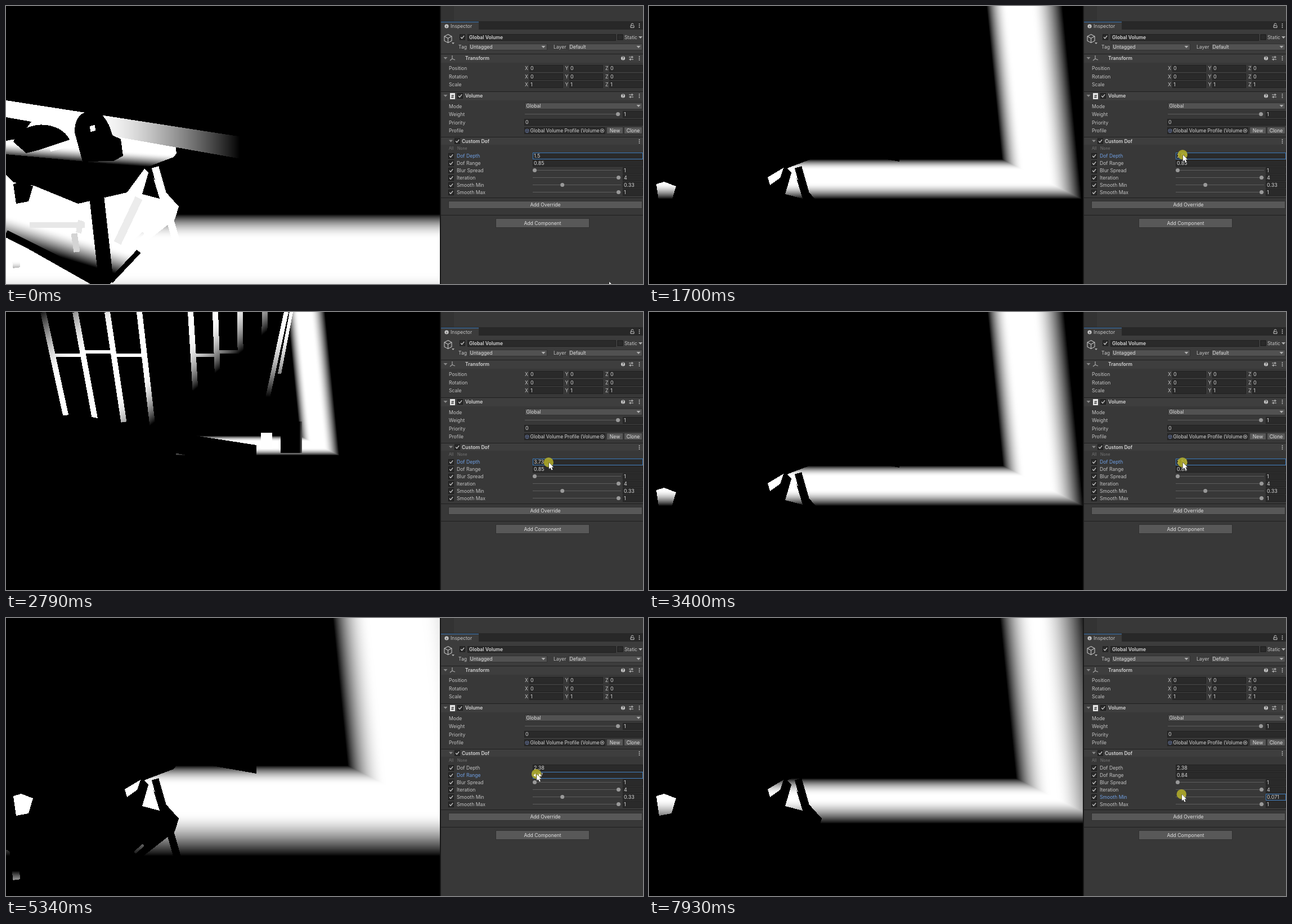
Animation, 1132 px wide and 495 px high, one loop 8 s. Source, as an HTML page with a canvas:

```html
<!DOCTYPE html>
<html>
<head>
<meta charset="utf-8">
<style>
html, body { margin: 0; width: 100%; height: 100%; overflow: hidden; background: #000 }
canvas { display: block }
</style>
</head>
<body>
<canvas id="stage" width="1132" height="495"></canvas>
<script>
const W = 772, H = 495, LOOP = 8000;
const ctx = stage.getContext('2d');
const pen = new OffscreenCanvas(W, H).getContext('2d', { willReadFrequently: true });

const clamp = v => Math.min(1, Math.max(0, v));
const mix = (a, b, p) => a + (b - a) * p;
const smooth = p => p * p * (3 - 2 * p);
const span = (t, from, to) => clamp((t - from) / (to - from));
const ease = (t, from, to) => smooth(span(t, from, to));

// ---------- depth map of the room: every surface is a formula z(x, y) ----------
const depth = new Float32Array(W * H).fill(99);
const floorZ = (x, y) => 640 / (y - 74) - .235;
const plankZ = x => 1 / (.628 + .000728 * x);
const windowZ = (x, y) => 1 / (.3104 - .00017 * (y + .81 * x));
const topZ = (x, y) => Math.min(1.36, 1 / (.735 + .0078 * (y - 250 - .07 * (x - 100))));
const shelfZ = (x, y) => Math.min(1.36, 1 / (.735 + .0043 * (y - 395 - .3 * (x - 75))));
const legZ = (x, y) => 1.36 + Math.max(0, y - 430) * .012;
const poleZ = (x, y) => 3.82 + y * .0022;
const NEAR = .9;

function surface(z, path, width) {
  pen.clearRect(0, 0, W, H);
  pen.lineWidth = width;
  width ? pen.stroke(new Path2D(path)) : pen.fill(new Path2D(path));
  const px = pen.getImageData(0, 0, W, H).data;
  for (let i = 0; i < W * H; i++)
    if (px[i * 4 + 3] > 127) depth[i] = z.call ? z(i % W, i / W | 0) : z;
}
const bar = (z, width, x1, y1, x2, y2) => surface(z, `M${x1},${y1}L${x2},${y2}`, width);

function buildRoom() {
  // floor, and the right wall that shares the depth of its foot
  for (let y = 0; y < H; y++) for (let x = 0; x < W; x++) {
    const onWall = y < .5 * x - 41;
    const foot = onWall ? (x - 4.1 - .1 * y) / .95 * .5 - 41 : y;
    if (foot > 200) depth[y * W + x] = floorZ(x, foot);
  }

  // two barred windows, their bars leaning towards a vanishing point
  for (const [start, gap] of [[66, 57], [328, 44]]) {
    const lean = x => .0006 * (430 - x);
    for (let i = 0; i < 4; i++) {
      const x = start + gap * i, bottom = 184 + 6 * i, y = 77 - 6 * (i % 2);
      bar(windowZ, 10, x, 0, x + lean(x) * bottom, bottom);
      if (i < 3) bar(windowZ, 6, x + lean(x) * y, y, x + gap + lean(x + gap) * y, y);
    }
  }
  bar(poleZ, 8, 498, 0, 463, 162);
  bar(poleZ, 6, 507, 0, 486, 110);

  // buckets
  bar(3.58, 21, 463, 215, 463, 244);
  bar(x => 3.28 + Math.max(0, x - 519) * .012, 38, 507, 195, 507, 251);

  // workbench: top, plank, shelf
  surface(topZ, 'M0,198L301,249L303,262L298,269L245,289L0,272Z');
  surface(plankZ, 'M0,168L445,237V277L0,198Z');
  surface(shelfZ, 'M0,290L245,288L307,357L300,380L236,430V440L185,495H150L0,410Z');
  bar(1.29, 14, 236, 342, 198, 422);
  bar(1.28, 9, 42, 390, 140, 390);
  bar(1.28, 10, 133, 382, 129, 404);
  bar(1.25, 11, 121, 405, 126, 438);
  bar(legZ, 13, 12, 408, 19, 466);
  surface(NEAR, 'M0,264L248,287L215,332L128,352L50,320L14,314L0,300Z');

  // gaps that show the floor
  surface(floorZ, 'M13,317L27,313L48,321L40,348L18,352Z');
  surface(floorZ, 'M242,335L256,287L273,343Z');
  surface(floorZ, 'M211,305L239,288L233,306L215,319Z');
  bar(floorZ, 5, 229, 418, 244, 404);

  bar(legZ, 13, 265, 287, 311, 449);
  bar(NEAR, 13, 0, 405, 155, 483);
  bar(NEAR, 9, 186, 490, 236, 437);
  bar(NEAR, 26, 161, 338, 178, 492);

  // helmet and lantern
  surface(NEAR, 'M0,198L45,206L22,236L0,240Z');
  surface(NEAR, 'M13,242A52,39 0 0 1 113,238L60,256L36,262Z');
  bar(1.35, 9, 78, 255, 114, 246);
  surface(1.5, 'M92,206Q117,204 121,221', 4);
  surface(NEAR, 'M136,277L122,225Q122,188 152,187Q178,188 189,230L204,237L208,267L191,276Z');
  bar(plankZ, 9, 153, 213, 155, 223);
}
buildRoom();

const image = ctx.createImageData(W, H);
const pixels = new Uint32Array(image.data.buffer);
let shown = '';

// White inside the focus band, fading to black at its limits, with display gamma
function drawMask(focus, range, min) {
  const key = [focus, range, min].join();
  if (key !== shown) {
    shown = key;
    for (let i = 0; i < depth.length; i++) {
      const d = Math.abs(depth[i] - focus) * 2 / range;
      const v = d >= 1 ? 0 : 255 * (1 - smooth(span(d, min, 1))) ** .4545;
      pixels[i] = 0xff000000 | (v | 0) * 0x10101;
    }
  }
  ctx.putImageData(image, 0, 0);
}

// ---------- inspector panel ----------
const TEXT = '#c4c4c4', BRIGHT = '#d6d6d6', DARK = '#2a2a2a', BLUE = '#6f9fe2', RING = '#3a79bb';

function box(x, y, w, h, fill, stroke) {
  ctx.fillStyle = fill;
  ctx.fillRect(x, y, w, h);
  if (stroke) {
    ctx.strokeStyle = stroke;
    ctx.lineWidth = 1;
    ctx.strokeRect(x + .5, y + .5, w - 1, h - 1);
  }
}
function text(s, x, y, { color = TEXT, bold, size = 8.6, align = 'left' } = {}) {
  ctx.font = `${bold ? 600 : 400} ${size}px Inter, sans-serif`;
  ctx.textAlign = align;
  ctx.fillStyle = color;
  ctx.fillText(s, x, y + 3.2);
}
function dot(x, y, r, color = TEXT) {
  ctx.fillStyle = color;
  ctx.beginPath();
  ctx.arc(x, y, r, 0, 7);
  ctx.fill();
}
function line(d, color = TEXT, width = 1) {
  ctx.strokeStyle = color;
  ctx.lineWidth = width;
  ctx.stroke(new Path2D(d));
}
function shape(d, color) {
  ctx.fillStyle = color;
  ctx.fill(new Path2D(d));
}
const arrow = (x, y, color = '#b0b0b0') => shape(`M${x - 3.5},${y - 2}h7l-3.5,4z`, color);
const rule = y => box(773, y, 359, 1, '#1f1f1f');
const menu = y => [-3, 0, 3].forEach(d => dot(1125.5, y + d, .9));

function button(s, x, y, w, h) {
  box(x, y, w, h, '#585858', '#303030');
  text(s, x + w / 2, y + h / 2, { align: 'center', color: '#e0e0e0' });
}
function field(s, x, y, w, ring) {
  box(x, y - 6, w, 12, DARK, ring || '#212121');
  text(s, x + 2, y, { color: BRIGHT, size: 8.9 });
}
function dropdown(s, x, y, w) {
  box(x, y - 6, w, 12, '#515151', '#303030');
  text(s, x + 2.5, y, { color: '#dedede' });
  arrow(x + w - 7, y);
}
function check(x, y, on = true) {
  box(x - 5, y - 5, 10, 10, DARK, '#1c1c1c');
  if (on) line(`M${x - 2.8},${y}l2,2.3l4,-5`, BRIGHT, 1.2);
}
function slider(x, y, w, part) {
  box(x, y - .5, w, 1, '#5e5e5e');
  dot(x + 3.5 + part * (w - 8), y, 3.5, '#999');
}
function header(y, title, x, h) {
  rule(y - 8);
  box(773, y - 7, 359, h, '#3e3e3e');
  text(title, x, y, { bold: true, color: BRIGHT });
  menu(y);
}
function headerIcons(y) {
  arrow(781, y, '#888');
  dot(1096.5, y, 3.6);
  text('?', 1096.5, y, { color: '#333', bold: true, size: 7, align: 'center' });
  line(`M1107,${y - 2}h8M1107,${y + 2}h8M1112.5,${y - 4}v4M1109.5,${y}v4`);
}

function drawObjectHeader() {
  box(773, 0, 23, 27, '#333');
  box(773, 27, 359, 15, '#282828');
  box(773, 28, 67, 14, '#3c3c3c');
  box(773, 28, 67, 1, RING);
  dot(783, 36, 3.6);
  box(782.5, 35, 1, 3, '#333');
  text('Inspector', 790, 36);
  line('M1111,35v-2a2,2 0 0 1 4,0M1110,35h6v3.5h-6z');
  menu(35);

  box(773, 42, 359, 43, '#3c3c3c');
  line('M785.5,50.5l6.5,3.5v8l-6.5,3.5l-6.5,-3.5v-8zM779,54l6.5,3.5l6.5,-3.5M785.5,57.5v8', TEXT, 1.1);
  shape('M792,65h5l-2.5,3z', '#b0b0b0');
  check(811, 55.5);
  box(820, 50, 264, 12, DARK, '#212121');
  text('Global Volume', 823, 56, { bold: true, color: BRIGHT });
  check(1091.5, 55.5, false);
  text('Static', 1099, 56);
  arrow(1127.5, 56);
  text('Tag', 804, 73);
  dropdown('Untagged', 822, 73, 140);
  text('Layer', 973, 73);
  dropdown('Default', 999, 73, 132);
}

function drawTransform() {
  header(93, 'Transform', 816, 15);
  headerIcons(93);
  line('M793,88v6l-4,3M793,94l5,2', '#a8a8a8', 1.2);
  ['Position', 'Rotation', 'Scale'].forEach((name, i) => {
    const y = 111 + i * 14.5;
    text(name, 787, y);
    ['X', 'Y', 'Z'].forEach((axis, j) => {
      text(axis, 922 + j * 71.5, y);
      field(i === 2 ? '1' : '0', 930 + j * 71, Math.round(y), 60);
    });
  });
}

function drawVolume() {
  header(160, 'Volume', 816, 15);
  headerIcons(160);
  box(789, 155, 9, 11, '#e4e4e4');
  text('#', 793.5, 160.5, { color: '#333', bold: true, size: 8, align: 'center' });
  check(807, 160);
  ['Mode', 'Weight', 'Priority', 'Profile'].forEach((s, i) => text(s, 787, 178.5 + i * 14.5));
  dropdown('Global', 922, 178, 209);
  slider(922, 192.5, 170, 1);
  field('1', 1096, 193, 36);
  field('0', 921, 207, 211);
  field('', 921, 222, 144);
  line('M926,219l3,1.5v3.5l-3,1.5l-3,-1.5v-3.5zM923,220.5l3,1.5l3,-1.5M926,222v3.5', '#6c7fb0', .8);
  text('Global Volume Profile (Volume', 931.5, 222, { color: BRIGHT });
  box(1054, 217, 10, 10, DARK);
  dot(1059.5, 222, 1.3);
  line('M1056.3,222a3.2,3.2 0 1 0 6.4,0a3.2,3.2 0 1 0 -6.4,0', TEXT, .9);
  button('New', 1067, 215, 30, 13);
  button('Clone', 1098, 215, 33, 13);
}

function drawDof(focus, range, min, active) {
  header(241, 'Custom Dof', 810, 13);
  arrow(790.5, 240.5, '#888');
  check(802, 240.5);
  text('All', 787, 253, { color: '#777', size: 7 });
  text('None', 802, 253, { color: '#777', size: 7 });
  const short = (v, digits) => String(+v.toFixed(digits));
  // name, shown value, slider position
  [
    ['Dof Depth', short(focus, 2)],
    ['Dof Range', short(range, 2)],
    ['Blur Spread', '1', 0],
    ['Iteration', '4', 1],
    ['Smooth Min', short(min, 3), min],
    ['Smooth Max', '1', 1]
  ].forEach(([name, value, part], i) => {
    const y = 267 + i * 13, ring = name === active && RING;
    check(791, y);
    text(name, 801, y, { color: ring ? BLUE : TEXT });
    if (part === undefined) return field(value, 936, y, 196, ring);
    slider(936, y - .5, 157, part);
    field(value, 1096, y, 36, ring);
  });
  rule(341);
  button('Add Override', 786, 347, 345, 14);
  rule(372);
  button('Add Component', 870, 378, 167, 17);
}

// ---------- pointer ----------
function drawCursor(t, { focus, range, min }) {
  // the pointer follows the dragged value and glides between the three rows
  const toDepth = ease(t, 70, 830), toRange = ease(t, 3900, 4560), toMin = ease(t, 6360, 7130);
  const glide = (start, a, b, c) => mix(mix(mix(start, a, toDepth), b, toRange), c, toMin);
  const x = glide(1072, 913.5 + 13.8 * focus, 914 + 19 * range - toRange * .5, 935.5 + 162 * min);
  const y = glide(491, 265 + 3 * ease(t, 2100, 2700), 278, 314);

  const pressed = t > 975 && t < 3900 || t > 4880 && t < 6250 || t > 7180;
  const resizing = t > 910 && t < 1060 || t > 4700 && t < 6360;
  if (pressed) dot(x - .7, y - .3, 8.7, 'rgba(190,184,40,.8)');
  if (resizing) shape(`M${x - 6},${y + 2}l4,-3v6zM${x + 8},${y + 2}l-4,-3v6z`, '#fff');
  const d = `M${x},${y}v11.5l2.6,-2.3l2,4.4l2,-.9l-2,-4.2h3.6z`;
  line(d, '#222', 1);
  shape(d, '#fff');
  if (t > 4450 && t < 4880) {
    box(945, 236, 21, 21, '#a01616');
    line('M950.5,245a4.3,4.3 0 1 0 8.6,0a4.3,4.3 0 1 0 -8.6,0M958,248.3l4,4', '#e8c8c8', 1.2);
  }
}

function valuesAt(t) {
  const fall = 1 - (1 - span(t, 2790, 3880)) ** 2.5;
  return {
    focus: mix(mix(1.5, 3.73, ease(t, 975, 2470)), 2.38, fall),
    range: mix(mix(.85, 1.72, ease(t, 4880, 5510)), .84, ease(t, 5740, 6085)),
    min: mix(.33, .071, ease(t, 7180, 7930))
  };
}

function frame(now) {
  const t = now % LOOP, values = valuesAt(t);
  const { focus, range, min } = values;
  drawMask(focus, range, min);
  box(W - 1, 0, 361, H, '#383838');
  box(W - 1, 0, 2, H, '#191919');
  drawObjectHeader();
  drawTransform();
  drawVolume();
  drawDof(focus, range, min, t < 4880 ? 'Dof Depth' : t < 7180 ? 'Dof Range' : 'Smooth Min');
  drawCursor(t, values);
  requestAnimationFrame(frame);
}
requestAnimationFrame(frame);
</script>
</body>
</html>
```
